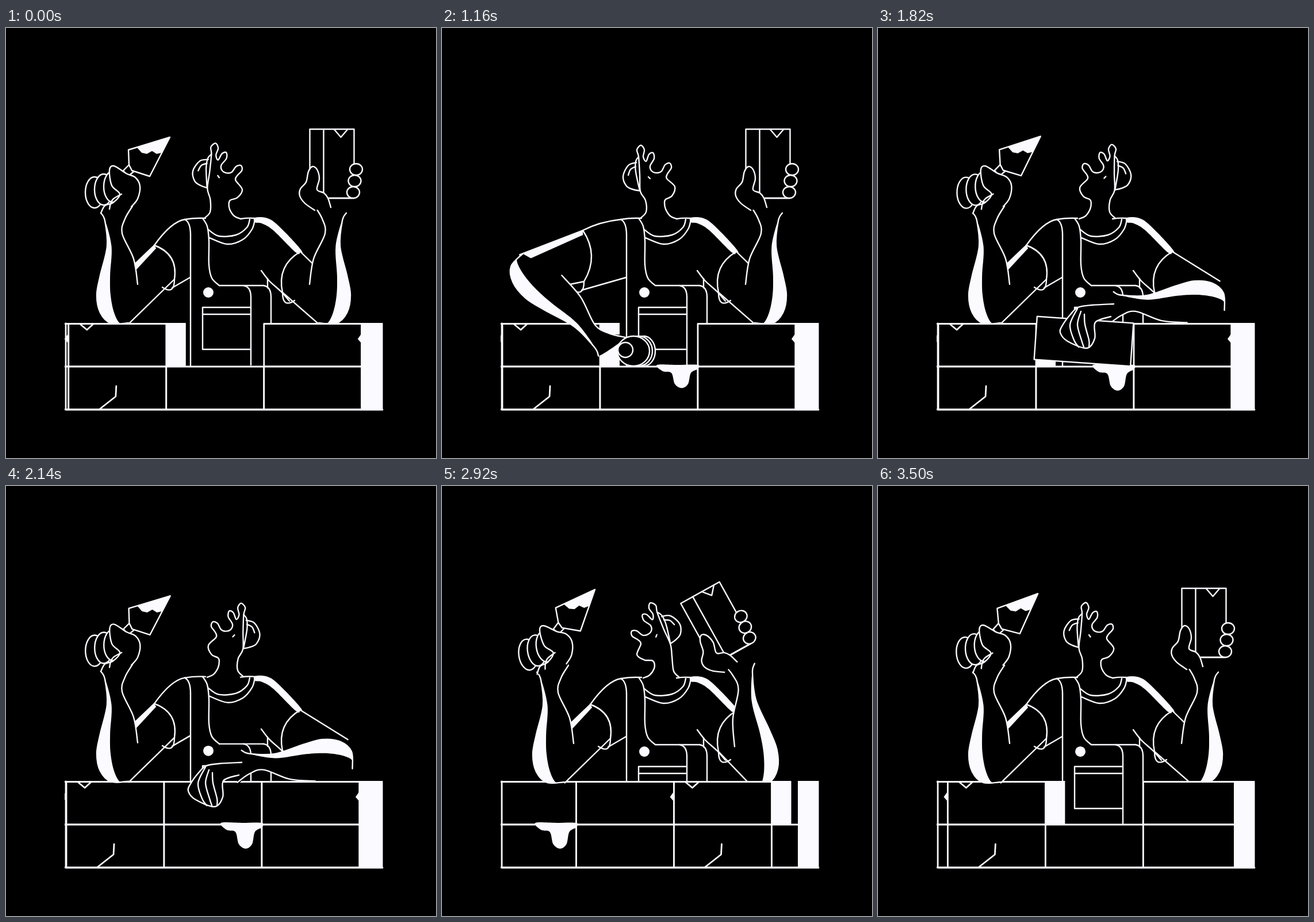
Animation, 748 px wide and 748 px high, one loop 3.52 s. Source, as an HTML page with a canvas:

```html
<!DOCTYPE html>
<html lang="en">
<head>
<meta charset="utf-8">
<title>Bricklayer</title>
<style>
html, body { margin: 0; width: 100%; height: 100%; overflow: hidden; background: #000; }
canvas { display: block; width: 748px; height: 748px; }
</style>
</head>
<body>
<canvas id="stage" width="748" height="748"></canvas>
<script>
const ctx = document.getElementById('stage').getContext('2d');
const LOOP = 3520, WHITE = '#fbfaff', BLACK = '#000', DEG = Math.PI / 180;

// ---- maths ----
const clamp = v => Math.max(0, Math.min(1, v));
const ease = p => p * p * (3 - 2 * p);
const linear = p => p;
const lerp = (a, b, p) => a + (b - a) * p;
const mix = (a, b, p) => a.map((v, i) => lerp(v, b[i], p));
const spin = ([x, y], [cx, cy], angle) => {
  const c = Math.cos(angle), s = Math.sin(angle);
  return [cx + (x - cx) * c - (y - cy) * s, cy + (x - cx) * s + (y - cy) * c];
};
const pairs = list => list.reduce((out, v, i) => (i % 2 ? out[out.length - 1].push(v) : out.push([v]), out), []);
function segment(keys, t) {
  let i = 0;
  while (i < keys.length - 2 && t >= keys[i + 1][0]) i++;
  const [a, b] = [keys[i], keys[i + 1]];
  return [a[1], b[1], clamp((t - a[0]) / (b[0] - a[0]))];
}
function track(keys, t, easing = ease) {
  const [a, b, p] = segment(keys, t);
  return lerp(a, b, easing(p));
}

// ---- drawing ----
function trace(pts, closed) {
  const n = pts.length;
  const at = i => pts[closed ? (i + n) % n : Math.max(0, Math.min(n - 1, i))];
  ctx.beginPath();
  ctx.moveTo(...pts[0]);
  for (let i = 0; i < (closed ? n : n - 1); i++) {
    const [a, b, c, d] = [at(i - 1), at(i), at(i + 1), at(i + 2)];
    ctx.bezierCurveTo(b[0] + (c[0] - a[0]) / 6, b[1] + (c[1] - a[1]) / 6,
      c[0] - (d[0] - b[0]) / 6, c[1] - (d[1] - b[1]) / 6, ...c);
  }
}
const fill = color => { ctx.fillStyle = color; ctx.fill(); };
const stroke = (pts, closed) => { trace(pts, closed); ctx.stroke(); };
const blob = pts => { trace(pts, true); fill(WHITE); };
const curve = (...xy) => stroke(pairs(xy));
const skin = (...xy) => { trace(pairs(xy)); fill(BLACK); ctx.stroke(); };
function path(...xy) {
  ctx.beginPath();
  pairs(xy).forEach(p => ctx.lineTo(...p));
  return { line: () => ctx.stroke(), solid: () => fill(WHITE), shape: () => { ctx.closePath(); fill(BLACK); ctx.stroke(); } };
}
const arc = (from, ctrl, to) => {
  ctx.beginPath();
  ctx.moveTo(...from);
  ctx.quadraticCurveTo(...ctrl, ...to);
  ctx.stroke();
};
function oval(x, y, rx, ry = rx) {
  ctx.beginPath();
  ctx.ellipse(x, y, rx, ry, 0, 0, 7);
  fill(BLACK);
  ctx.stroke();
}
const dot = (x, y, r) => {
  ctx.beginPath();
  ctx.arc(x, y, r, 0, 7);
  fill(WHITE);
};

// ---- hands, each drawn around its own wrist ----
const hands = {
  fist: { wrist: [190, 320], draw() {
    path(204, 248, 214, 238, 222, 250, 212, 258).shape();
    path(213, 212, 285, 190, 250, 258, 219, 248, 214, 238).shape();
    path(228, 208, 285, 190, 271, 217, 262, 219, 254, 214, 245, 219, 236, 217).solid();
    for (let i = 0; i < 3; i++) oval(154 + 16 * i, 286 - 5 * i, 16, 27);
    skin(165, 322, 172, 309, 186, 304, 198, 289, 184, 274, 180, 247, 188, 240, 209, 253, 225, 260, 233, 275, 229, 297, 218, 311);
    curve(180, 315, 182, 305, 187, 297, 201, 289);
  } },
  swipe: { wrist: [325, 454], draw() {
    path(429, 386, 424, 423, 455, 447, 482, 407, 510, 388).shape();
    blob(pairs([426, 351, 436, 342, 455, 361, 470, 362, 488, 346, 512, 387, 478, 406, 458, 396, 440, 398, 435, 382]));
    oval(420, 444, 12, 9);
    for (let i = 0; i < 3; i++) oval(397 - 16 * i, 438 + i, 18, 26);
    skin(318, 439, 333, 430, 343, 419, 356, 415, 354, 432, 348, 455, 361, 463, 340, 464, 322, 470);
  } },
  press: { wrist: [290, 553], draw() {
    for (let i = 0; i < 3; i++) oval(351 - 9 * i, 562, 20 + 4 * i, 26);
    oval(319, 560, 13);
  } },
  grip: { wrist: [567, 320], draw() {
    skin(565, 312, 560, 296, 553, 287, 541, 281, 545, 262, 541, 246, 533, 241, 526, 250, 522, 268, 512, 280, 511, 292, 520, 305, 537, 317);
    path(562, 296, 602, 296).line();
    for (let i = 0; i < 3; i++) oval(609 - 2.5 * i, 246 + 20 * i, 11, 10);
  } },
  lay: { wrist: [410, 484], draw() {
    skin(405, 502, 378, 512, 377, 540, 363, 557, 330, 545, 317, 530, 321, 517, 335, 498, 348, 486, 372, 482, 410, 480);
    for (let i = 0; i < 3; i++) curve(347 + 6 * i, 488 + 5 * i, 334 + 13 * i, 516, 341 + 13 * i, 543, 349 + 9 * i, 555);
  } },
  palm: { wrist: [430, 520], draw() {
    skin(430, 504, 408, 496, 379, 468, 364, 456, 350, 453, 338, 456, 333, 464, 339, 480, 370, 503, 385, 518);
    for (let i = 0; i < 2; i++) curve(335 + 9 * i, 462 - 6 * i, 354 + 9 * i, 469 - 3 * i, 392 + 12 * i, 498);
    skin(352, 516, 352, 506, 359, 502, 372, 510);
  } }
};

// ---- arm poses: joints, cuff ends, hand and the carried brick ----
// brick: offset from the wrist, width, height, angle in degrees
const raised = { hand: 'fist', turn: 0, side: 1, lit: 1, elbow: [190, 490], wrist: [190, 320], top: [258, 378], low: [293, 437] };
const across = { ...raised, hand: 'swipe', side: -1, lit: 0.5, elbow: [176, 482], wrist: [325, 454] };
const spread = { ...raised, hand: 'press', side: -1, elbow: [145, 427], wrist: [290, 553], top: [245, 352], low: [247, 441] };
const scoop = { ...spread, wrist: [350, 548] };

const aloft = { hand: 'grip', turn: 0, side: -1, lit: 1, elbow: [567, 490], wrist: [567, 320], top: [512, 389], low: [481, 460], brick: [0, -84, 77, 120, 0] };
const tilted = { ...aloft, turn: -29, elbow: [557, 490], wrist: [519, 310], brick: [-41, -74, 77, 120, -29] };
const lowered = { ...aloft, hand: 'lay', elbow: [578, 470], wrist: [410, 484], brick: [-52, 61, 75, 168, -86] };
const placed = { ...lowered, brick: [-50, 67, 74, 170, -90] };
const wipe = { ...placed, hand: 'palm', elbow: [573, 492], wrist: [430, 518] };
const reach = { ...aloft, turn: -100, elbow: [575, 500], wrist: [440, 590], brick: [-83, 15, 77, 120, -100] };

const waved = turn => ({ ...raised, turn });
const leftKeys = [[0, raised], [160, waved(3)], [600, across], [900, scoop], [1160, spread], [1220, spread],
  [1580, waved(2)], [1820, waved(-1)], [2520, waved(2)], [2920, waved(-8)], [3500, waved(-3)], [LOOP, raised]];
const rightKeys = [[0, aloft], [1300, aloft], [1780, lowered], [1820, lowered], [1950, placed], [2130, placed],
  [2440, wipe], [2540, wipe], [2690, reach], [2920, tilted], [3250, aloft], [LOOP, aloft]];

// Swing the wrist around the elbow; the hand shape changes halfway.
function poseAt(keys, t) {
  let [a, b, p] = segment(keys, t);
  p = ease(p);
  const reachOf = o => [o.wrist[0] - o.elbow[0], o.wrist[1] - o.elbow[1]];
  const heading = o => Math.atan2(...reachOf(o).reverse());
  let swing = heading(b) - heading(a);
  swing = Math.atan2(Math.sin(swing), Math.cos(swing));
  const length = lerp(Math.hypot(...reachOf(a)), Math.hypot(...reachOf(b)), p);
  const angle = heading(a) + swing * p;
  const same = a.hand === b.hand, early = p < 0.5, elbow = mix(a.elbow, b.elbow, p);
  return {
    elbow,
    wrist: [elbow[0] + length * Math.cos(angle), elbow[1] + length * Math.sin(angle)],
    top: mix(a.top, b.top, p),
    low: mix(a.low, b.low, p),
    side: lerp(a.side, b.side, p),
    lit: lerp(a.lit, b.lit, p),
    brick: a.brick && mix(a.brick, b.brick, p),
    hand: early ? a.hand : b.hand,
    turn: same ? lerp(a.turn, b.turn, p) * DEG
      : early ? a.turn * DEG + swing * p : b.turn * DEG - swing * (1 - p)
  };
}

// Forearm silhouette: [share of the way to the wrist, distance from the bone].
const INNER = [[0.26, 39], [0.52, 32], [0.78, 12], [0.93, 17], [1.06, 30]];
const OUTER = [[0.99, -25], [0.91, -18], [0.65, -14], [0.35, -26], [0.15, -32], [-0.03, -26], [-0.14, -7], [-0.135, 23]];

function drawForearm({ elbow, wrist, side, lit }) {
  const dx = wrist[0] - elbow[0], dy = wrist[1] - elbow[1], length = Math.hypot(dx, dy);
  const place = ([along, off]) => {
    const k = off * side / length;
    return [elbow[0] + dx * along - dy * k, elbow[1] + dy * along + dx * k];
  };
  const inner = INNER.map(place), outer = OUTER.map(place);
  trace([...inner, ...outer]);
  fill(BLACK);
  stroke(inner);
  stroke(outer);
  const rim = OUTER.slice(1);
  const shade = rim.map(([along, off], i) => place([along, off + 25 * lit * Math.sin(Math.PI * (i / 6) ** 1.3)]));
  blob([...outer.slice(1), ...shade.slice(1, -1).reverse()]);
}

// out is the direction away from the body: -1 left, 1 right.
function drawUpperArm({ top, low, elbow }, out, lit) {
  const mid = mix(top, low, 0.5);
  const dx = elbow[0] - mid[0], dy = elbow[1] - mid[1], r = out * 34 / Math.hypot(dx, dy);
  const tip = [elbow[0] + dy * r, elbow[1] - dx * r];
  const base = [elbow[0] - dy * r, elbow[1] + dx * r];
  path(...top, ...tip, ...base, ...low);
  fill(BLACK);
  path(...top, ...tip).line();
  path(...low, ...base).line();
  if (lit) path(...top, ...tip, ...mix(tip, base, 0.2), ...mix(top, low, 0.09)).solid();
  const cx = low[0] - top[0], cy = low[1] - top[1], bulge = -out * 28 / Math.hypot(cx, cy);
  arc(top, [mid[0] + cy * bulge, mid[1] - cx * bulge], low);
  arc(low, [low[0], low[1] + 28], [low[0] + out * 21, low[1] + 14]);
}

function drawHand({ hand, wrist, turn }) {
  const h = hands[hand];
  ctx.save();
  ctx.translate(...wrist);
  ctx.rotate(turn);
  ctx.translate(-h.wrist[0], -h.wrist[1]);
  h.draw();
  ctx.restore();
}

function drawBrick([x, y], [dx, dy, w, h, angle]) {
  ctx.save();
  ctx.translate(x + dx, y + dy);
  ctx.rotate(angle * DEG);
  ctx.translate(-w / 2, -h / 2);
  path(0, 0, w, 0, w, h, 0, h).shape();
  if (h < 140) {
    path(24, 0, 24, h).line();
    path(42, 0, 54, 14, 66, 0).line();
  }
  ctx.restore();
}

function drawLeftArm(t) {
  const arm = poseAt(leftKeys, t);
  drawUpperArm(arm, -1, true);
  arc([311, 333], [arm.top[0] + 29, 337], arm.top);
  path(320, 434, arm.low[0] - 4, arm.low[1] + 15).line();
  drawForearm(arm);
  drawHand(arm);
}

function drawRightArm(t) {
  const arm = poseAt(rightKeys, t);
  drawUpperArm(arm, 1, false);
  drawForearm(arm);
  if (t < 1950 || t > 2615) drawBrick(arm.wrist, arm.brick);
  drawHand(arm);
}

function drawHead(t) {
  const angle = track([[0, 9.4], [450, 0], [1300, 0], [1820, 2.8], [2520, 0], [2920, 25], [3500, 8], [LOOP, 9.4]], t) * DEG;
  const flip = track([[0, 1], [1450, 1], [1620, -1], [3080, -1], [3260, 1], [LOOP, 1]], t);
  // The neck twists gradually below the jaw.
  const draw = (...xy) => stroke(pairs(xy).map(p => {
    const [x, y] = spin(p, [377, 315], angle * clamp((318 - p[1]) / 35));
    return [379 + (x - 379) * flip, y];
  }));
  draw(345, 331, 355, 320, 354, 300, 345, 284, 344, 255, 342, 224, 339, 212, 346, 204, 352, 212,
    350, 224, 355, 232, 360, 220, 367, 217, 369, 227, 362, 240, 365, 249, 374, 252, 382, 249, 388, 238, 396, 235,
    399, 243, 392, 254, 391, 262, 405, 276, 400, 292, 389, 298, 387, 304, 389, 315, 397, 327, 408, 332);
  draw(342, 224, 337, 232, 337, 250, 344, 283);
  draw(338, 234, 324, 239, 315, 258, 321, 275, 333, 281, 344, 283);
  draw(337, 241, 328, 246, 324, 256);
  draw(359, 259, 362, 262);
}

function drawBody() {
  arc([311, 333], [328, 330], [347, 331]);
  arc([408, 332], [420, 330], [433, 331]);
  curve(351, 350, 370, 362, 400, 360, 419, 347, 424, 333);
  curve(354, 365, 385, 376, 412, 368, 428, 350, 433, 333);
  arc([311, 333], [321, 338], [321, 360]);
  path(321, 360, 321, 588).line();
  curve(342, 331, 350, 345, 353, 370, 353, 412, 358, 435, 371, 448);
  path(371, 448, 448, 448).line();
  for (const [x, end] of [[461, 588], [426, 586]]) {
    arc([x - 13, 448], [x, 450], [x, 468]);
    path(x, 468, x, end).line();
  }
  path(426, 486, 342, 486, 342, 559, 426, 559).line();
  path(342, 498, 426, 498).line();
  dot(352, 460, 9);
  curve(444, 422, 458, 440, 478, 458, 493, 475);
  path(455, 436, 455, 452).line();
  blob(pairs([433, 330, 455, 331, 475, 345, 514, 387, 505, 391, 465, 352, 445, 340, 433, 338]));
}

function drawWall(t) {
  const shift = t < 20 ? -4 * (1 - t / 20)
    : track([[20, 0], [2502, 0], [2920, 211], [3500, 493], [LOOP, 506]], t, linear);
  ctx.save();
  ctx.beginPath();
  ctx.rect(102, 512, 518, 154);
  ctx.clip();
  ctx.lineWidth = 2.8;
  for (let k = -2; k < 6; k++) {
    const x = 275 + 170 * k - shift;
    const gap = k === 3 || (k === 0 && t < 1950);
    ctx.fillStyle = x > 612 ? WHITE : BLACK;
    for (const y of gap ? [589] : [514.5, 589]) {
      ctx.fillRect(x, y, 170, 74.5);
      ctx.strokeRect(x, y, 170, 74.5);
    }
    ctx.fillStyle = WHITE;
    if (gap) ctx.fillRect(x, 513, 34, 76);
  }
  for (const copy of [-510, 0, 510]) {
    ctx.save();
    ctx.translate(copy - shift, 0);
    path(125, 515, 137, 525, 148, 515).line();
    path(615, 531, 608, 541, 615, 549).solid();
    path(188, 623, 187, 641, 159, 663).line();
    ctx.restore();
  }
  const drip = track([[0, 0], [820, 0], [1120, 1], [1500, 1.12], [LOOP, 1.12]], t);
  if (drip > 0) {
    ctx.translate(-shift, 586 * (1 - drip));
    ctx.scale(1, drip);
    blob(pairs([374, 586, 384, 597, 399, 600, 405, 619, 417, 626, 428, 619, 433, 600, 445, 593, 445, 586, 410, 586]));
  }
  ctx.restore();
  ctx.lineWidth = 2.8;
  path(104, 514, 104, 664, 655, 664).line();
  ctx.fillStyle = WHITE;
  ctx.fillRect(619, 513, 36.5, 152);
}

function drawScene(t) {
  ctx.fillStyle = BLACK;
  ctx.fillRect(0, 0, 748, 748);
  ctx.strokeStyle = WHITE;
  ctx.lineCap = ctx.lineJoin = 'round';
  const bob = track([[0, 0], [1950, 0], [2450, 2], [3500, 2], [LOOP, 0]], t);
  const figure = (...parts) => {
    ctx.save();
    ctx.translate(0, bob);
    ctx.lineWidth = 2.4;
    parts.forEach(part => part(t));
    ctx.restore();
  };
  const inFront = t > 1300 && t < 2290;
  figure(drawBody, drawHead);
  if (!inFront) figure(drawRightArm);
  const fall = (t - 2520) / 100;
  if (Math.abs(fall) < 1) dot(283 - 14 * fall, 491 + 8 * fall * fall, 3);
  drawWall(t);
  if (inFront) figure(drawRightArm);
  figure(drawLeftArm);
}

function frame() {
  drawScene(performance.now() % LOOP);
  requestAnimationFrame(frame);
}
frame();
</script>
</body>
</html>
```
